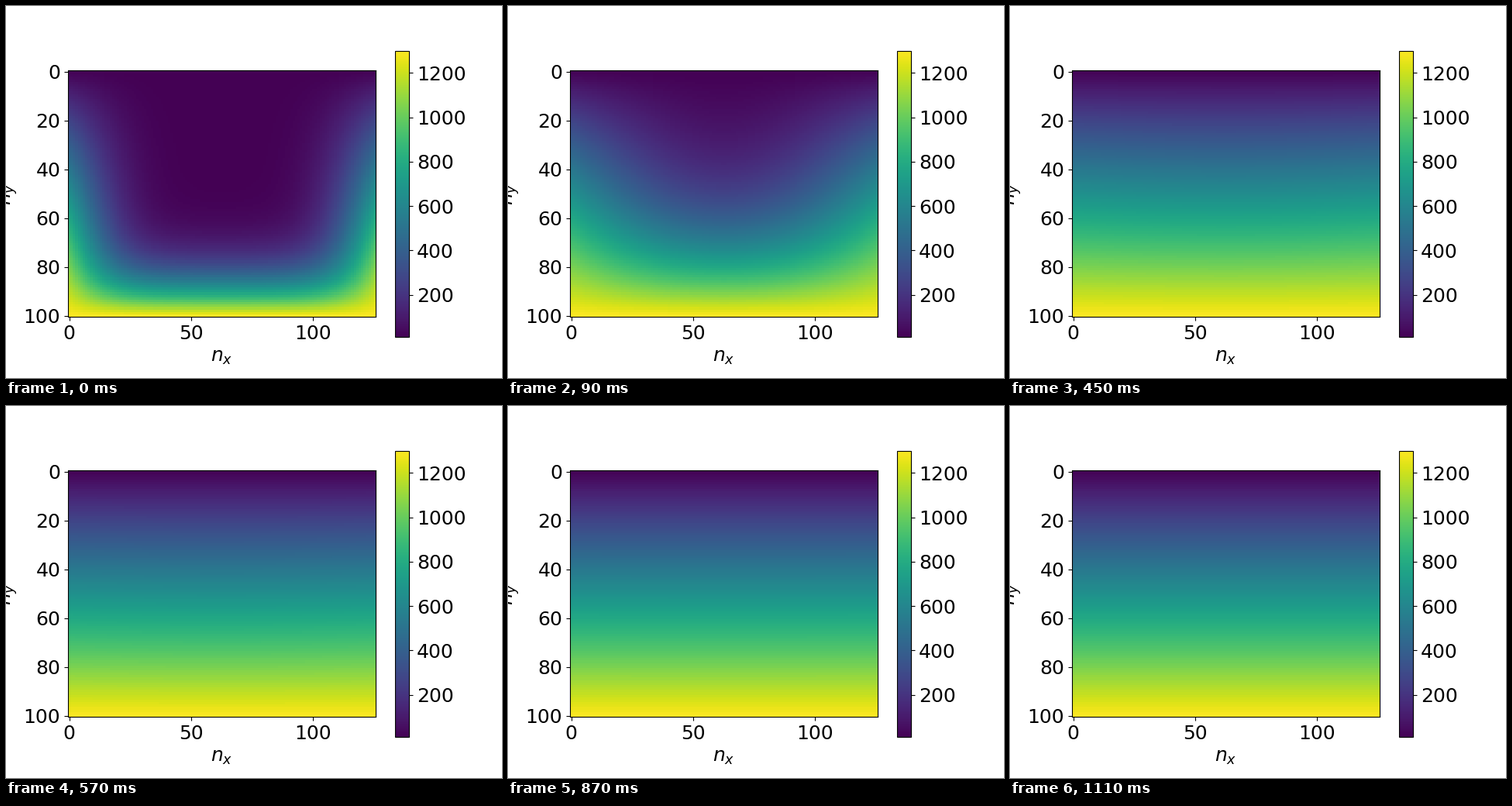
Write a matplotlib script that moves like this. It is 640 px wide and 480 px high and loops after 2970 ms.

```python
import numpy as np
import matplotlib.pyplot as plt
from matplotlib.animation import FuncAnimation

NX, NY = 126, 101
COLD, HOT = 10, 1300
SPREAD = 150      # diffusivity * time per frame, in cells squared
STEPS = 37        # the field is settled after this many frames
FRAMES, INTERVAL = 99, 30

plt.rcParams.update({"font.family": "DejaVu Sans", "font.size": 18})

x = np.linspace(0, 1, NX)
y = np.linspace(0, 1, NY)
modes = np.arange(1, 41)


def decay(pos, weights, cells, spread):
    """Sine series with both ends held at zero, after diffusing by spread."""
    fade = np.exp(-(np.pi * modes / cells) ** 2 * spread)
    return np.sin(np.pi * np.outer(pos, modes)) @ (weights * fade)


def field(step):
    """Cold plate warming towards a linear profile fixed on its edges."""
    spread = SPREAD * (step + 1)
    flat = 4 / (np.pi * modes) * (modes % 2)
    ramp = 2 / (np.pi * modes) * (-1.0) ** (modes + 1)
    gap = np.outer(decay(y, ramp, NY - 1, spread),
                   decay(x, flat, NX - 1, spread))
    return COLD + (HOT - COLD) * (y[:, None] - gap)


fig, ax = plt.subplots(figsize=(6.4, 4.8), dpi=100)
image = ax.imshow(field(0), cmap="viridis", vmin=COLD, vmax=HOT)
ax.set_xticks(range(0, NX, 50))
ax.set_yticks(range(0, NY, 20))
ax.set_xlabel("$n_x$")
ax.set_ylabel("$n_y$")
fig.colorbar(image, ticks=range(200, HOT, 200))


def update(i):
    image.set_data(field(min(i, STEPS)))
    return [image]


anim = FuncAnimation(fig, update, frames=FRAMES, interval=INTERVAL,
                     repeat=True, repeat_delay=0)
plt.show()
```
